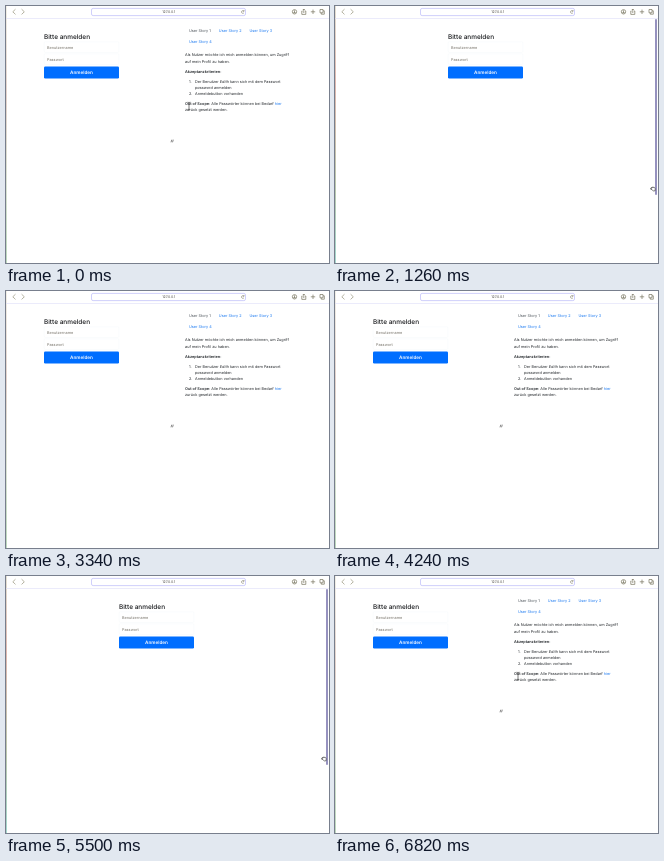
Write an HTML page that moves like this. It is 323 px wide and 257 px high and loops after 6840 ms.

```html
<!DOCTYPE html>
<html lang="de">
<head>
<meta charset="utf-8">
<title>Bitte anmelden</title>
<style>
  html, body { margin: 0; width: 100%; height: 100%; overflow: hidden; background: #fff; }
  #stage {
    position: relative; width: 323px; height: 257px; overflow: hidden; background: #fff;
    font: 15.3px/24.4px Inter, "Liberation Sans", sans-serif;
    color: #212529; text-rendering: geometricPrecision;
  }
  #stage > * { position: absolute; }
  #edge { left: 0; top: 0; width: 1.2px; height: 257px; }
  #edge.open { background: linear-gradient(#f1efe6, #e3d2cb 35%, #dae2d3 70%, #bcd8bd); }
  #edge.shut { background: linear-gradient(#e4e0d2, #e0b9b0 30%, #bcc9ae 70%, #a5d8cf); }
  /* page parts are laid out four times as large */
  #form, #story { left: 0; transform-origin: 0 0; }
  #form { top: 25.5px; width: 300px; }
  h1 { margin: 0 0 3px; font-size: 25.8px; line-height: 36px; font-weight: 500; color: #16181b; white-space: nowrap; }
  .field {
    box-sizing: border-box; height: 43.2px; padding-left: 11px; line-height: 41.2px;
    border: 1px solid #eaf0f5; border-radius: 5px; color: #77736a;
  }
  .field + .field { margin-top: 4.8px; }
  .button {
    margin-top: 7.6px; height: 48.4px; border-radius: 5px; background: #006eff;
    color: #fff; font-weight: 600; font-size: 18.6px; line-height: 48.4px; text-align: center;
  }
  #story { top: 20px; }
  nav { display: flex; flex-wrap: wrap; margin-bottom: 22px; }
  nav span { padding: 8.4px 16px; white-space: nowrap; }
  nav span, a { color: #1676f0; }
  nav .on { color: #495057; }
  p, ol { margin: 0 0 16px; }
  ol { padding-left: 40px; list-style: none; counter-reset: n; }
  li { position: relative; counter-increment: n; }
  li::before { content: counter(n) "."; position: absolute; left: -24px; }
  b { font-weight: 600; }
  #bar { left: 320.4px; top: 13px; width: 2.1px; border-radius: 1px; background: #9692bf; }
  svg { left: 0; top: 0; overflow: visible; }
</style>
</head>
<body>
<div id="stage">
  <div id="edge"></div>
  <div id="form">
    <h1>Bitte anmelden</h1>
    <div class="field">Benutzername</div>
    <div class="field">Passwort</div>
    <div class="button">Anmelden</div>
  </div>
  <div id="story">
    <nav><span class="on">User Story 1</span><span>User Story 2</span><span>User Story 3</span><span>User Story 4</span></nav>
    <p>Als Nutzer möchte ich mich anmelden können, um Zugriff auf mein Profil zu haben.</p>
    <p><b>Akzeptanzkriterien:</b></p>
    <ol>
      <li>Der Benutzer <i>Edith</i> kann sich mit dem Passwort <i>password</i> anmelden</li>
      <li>Anmeldebutton vorhanden</li>
    </ol>
    <p><b>Out of Scope:</b> Alle Passwörter können bei Bedarf <a>hier</a> zurück gesetzt werden.</p>
  </div>
  <div id="bar"></div>
  <svg width="323" height="257" fill="none" stroke="#77745f" stroke-width=".7">
    <path d="M0 12.5H323" stroke="#e2e2fa"/>
    <path d="M9.5 3.2L6.8 5.8L9.5 8.4M15.6 3.2L18.3 5.8L15.6 8.4" stroke="#96937a"/>
    <rect x="85.5" y="2.4" width="154" height="7.2" rx="1.6" stroke="#bcbcfa"/>
    <text x="162.7" y="7.4" font-size="3.5" text-anchor="middle" textLength="13" fill="#45433d" stroke="none">127.0.0.1</text>
    <path d="M238 5.2A1.4 1.4 0 1 0 238 6.8M238.1 4V5.3H236.8" stroke-width=".5"/>
    <circle cx="288.5" cy="5.8" r="2.2"/>
    <path d="M288.5 4.3V7.1M287.4 6L288.5 7.2L289.6 6"/>
    <path d="M296.5 5H295.8V8.4H299.8V5H299M297.8 7V3M296.8 4L297.8 3L298.8 4"/>
    <path d="M307 3.6V8M304.8 5.8H309.2"/>
    <path d="M314 3.5H317V6.8H314ZM317 4.8H318.3V8.2H315.3V6.8"/>
    <path id="grip" d="M-1 1.3L-.2 -1.3M.5 1.3L1.3 -1.3" stroke="#555"/>
    <g id="cursor">
      <path id="beam" d="M-1.3 -3.8Q0 -3.8 0 -2.8V2.8Q0 3.8 -1.3 3.8M1.3 -3.8Q0 -3.8 0 -2.8M0 2.8Q0 3.8 1.3 3.8" stroke="#444"/>
      <path id="arrow" d="M-.8 -1.3V2.4L0 1.7L.6 2.9L1.1 2.6L.6 1.5H1.7Z" fill="#111" stroke="#fff" stroke-width=".25"/>
      <path id="hand" d="M-2.3 -.8L-1 -.9V-1.8L1.4 -1.6L2.2 -.4V1.6L.4 2.1L-1 .6L-2.3 -.1Z" fill="#fff" stroke="#444"/>
    </g>
  </svg>
</div>
<script>
  const LOOP = 6840, HALF = LOOP / 2, OPEN = 166, SHUT = 317, SCALE = .25;
  const $ = id => document.getElementById(id);

  // time, x, y of the pointer; second half of the loop runs backwards
  const pointer = [
    [0, 183, 100], [380, 183, 100], [480, 166, 135], [520, 166, 135], [760, 317, 150],
    [820, 317, 170], [1000, 318, 183], [1540, 318, 183], [1740, 166, 150],
    [1860, 302, 159], [2040, 290, 110], [2280, 217, 19], [2480, 210, -8]
  ];
  const divider = [[520, OPEN], [760, SHUT], [1540, SHUT], [1740, OPEN]];

  const clamp = v => Math.min(1, Math.max(0, v));
  const ease = p => p * p * (3 - 2 * p);

  function track(steps, t, col) {
    const i = steps.findIndex(s => s[0] > t);
    if (i === 0) return steps[0][col];
    if (i < 0) return steps[steps.length - 1][col];
    const a = steps[i - 1], b = steps[i];
    return a[col] + (b[col] - a[col]) * ease((t - a[0]) / (b[0] - a[0]));
  }

  function shape(t) {
    if (t < 420) return "beam";
    const drag = t > 470 && t < 770, back = t > 980 && t < 1750;
    return drag || back ? "hand" : "arrow";
  }

  const place = (id, x, y) => $(id).setAttribute("transform", `translate(${x} ${y})`);
  const shift = (id, x) => $(id).style.transform = `translateX(${x}px) scale(${SCALE})`;

  function draw(now) {
    const time = now % LOOP;
    const t = time < HALF ? time : LOOP - time;
    const x = track(divider, t, 1);
    const extra = 95 * clamp((x - 262) / 40);
    const left = x + 13;

    shift("form", 38 + (x - OPEN) * 75 / 151);
    shift("story", left);
    $("story").style.width = Math.max(10, 288.5 - left) / SCALE + "px";
    $("bar").style.height = extra ? 244 * 244 / (244 + extra) + "px" : 0;
    $("edge").className = extra ? "shut" : "open";

    place("grip", x, 135 + extra / 2);
    place("cursor", track(pointer, t, 1), track(pointer, t, 2));
    const kind = shape(t);
    for (const id of ["beam", "arrow", "hand"]) $(id).style.display = id === kind ? "" : "none";
  }

  const start = performance.now();
  function tick() {
    draw(performance.now() - start);
    requestAnimationFrame(tick);
  }
  tick();
</script>
</body>
</html>
```
